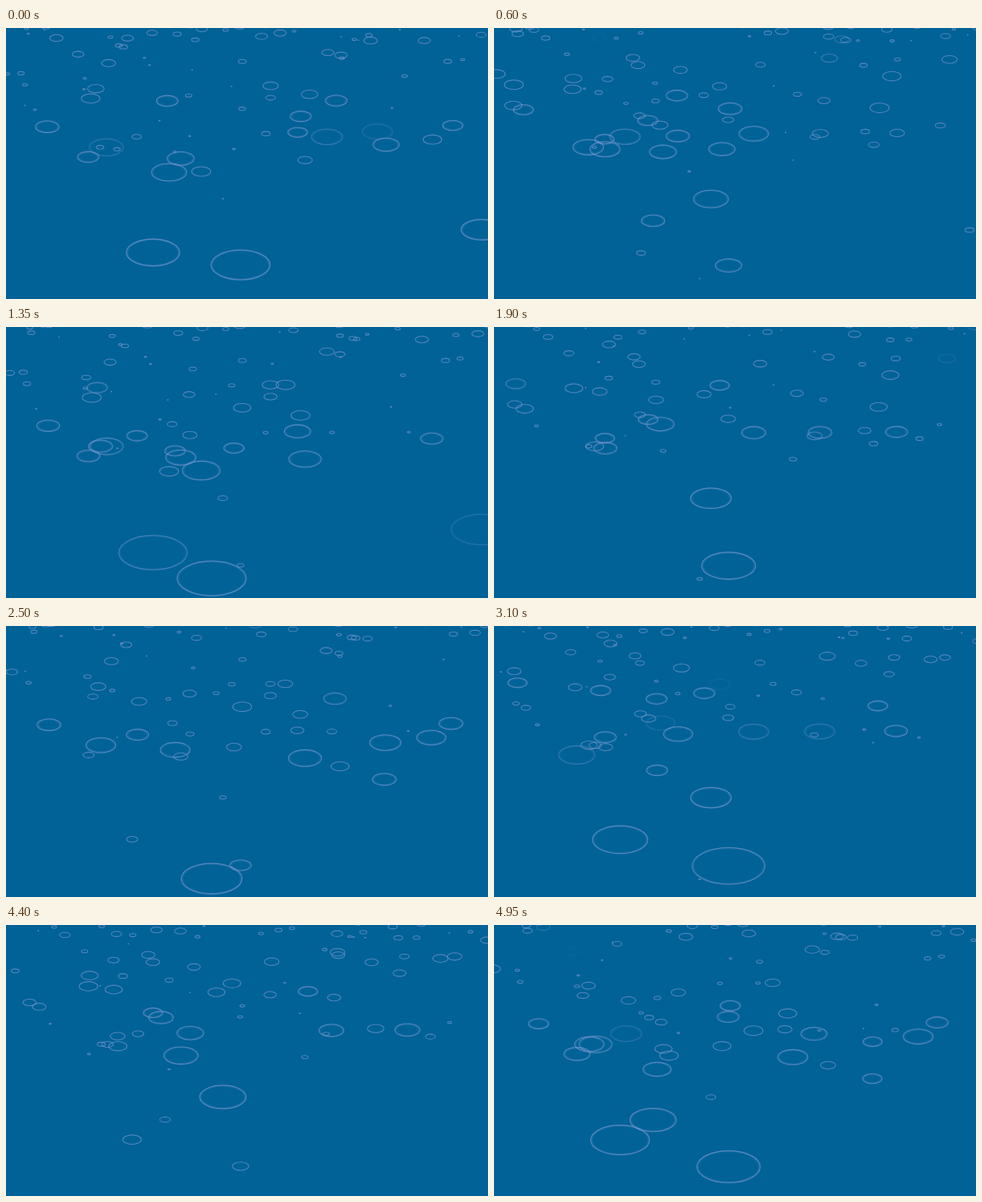
An HTML page with a canvas that plays this animation: 600x338 px, repeating every 5000 ms.

```html
<!DOCTYPE html>
<html lang="en">
<head>
<meta charset="utf-8">
<title>Rain on water</title>
<style>
  html, body { margin: 0; width: 100%; height: 100%; overflow: hidden; background: #006297; }
  canvas { display: block; width: 600px; height: 338px; }
</style>
</head>
<body>
<canvas id="water" width="600" height="338"></canvas>
<script>
const ctx = document.getElementById('water').getContext('2d');
const LOOP = 5, STEP = 0.05, LIFE = 0.9, FADE = 0.06;

let seed = 41;
function random() {
  seed = (seed * 16807) % 2147483647;
  return seed / 2147483647;
}

// A spot in the foreground where drops land at a steady beat
function steady(x, y, first, gap, count) {
  return { x, y, births: Array.from({ length: count }, (_, i) => first + i * gap) };
}

// A spot further out: denser towards the horizon, with random pauses
function scattered() {
  const y = -4 + 170 * random() ** 1.9;
  const spread = 630 - 2.5 * Math.max(0, y - 80);
  const x = 300 + (random() - 0.5) * spread;
  const births = [];
  for (let t = -1.5 * LIFE * random(); t < LOOP; t += LIFE * (1 + 0.7 * random())) births.push(t);
  return { x, y, births };
}

const spots = [
  steady(292, 295.5, -0.69, 0.98, 6),
  steady(183, 280, -0.67, 1.16, 2),
  steady(157, 263.8, 2.35, 1.8, 2),
  steady(256, 311.7, 0.6, 1.24, 3),
  steady(198, 240, 0.24, 4, 2),
  steady(592, 251.5, -0.59, 1.06, 2),
  steady(270, 213, -0.02, 1.2, 5),
  steady(203, 180, -0.75, 1.7, 4),
  steady(243, 179, -0.41, 0.95, 2),
  steady(471, 191, 2.02, 2.54, 2),
  steady(416, 175, 2.1, 1.26, 3),
  ...Array.from({ length: 115 }, scattered)
];

// Full ring radius at a given depth
function reach(y) {
  return 1.06 * (10.5 + 0.099 * (y - 46) + 0.00028 * (y - 46) * (y - 152));
}

function ring(x, y, r, alpha, width) {
  ctx.globalAlpha = alpha;
  ctx.lineWidth = width;
  ctx.beginPath();
  ctx.ellipse(x, y, r, r * 0.505, 0, 0, 2 * Math.PI);
  ctx.stroke();
}

function draw(t) {
  ctx.globalAlpha = 1;
  ctx.fillStyle = '#006297';
  ctx.fillRect(0, 0, 600, 338);
  ctx.strokeStyle = '#7d9bd2';
  for (const spot of spots) {
    // The camera tilts slowly: near water sinks, far water draws inwards
    const depth = spot.y - 180;
    const x = spot.x + (spot.x - 300) * Math.min(0, depth) * 0.00006 * t;
    const y = spot.y + Math.max(0, depth) * 0.0105 * t;
    const full = reach(spot.y);
    for (const birth of spot.births) {
      const p = (t - birth) / LIFE;
      if (p < 0 || p >= 1) continue;
      const r = Math.max(0.6, full * p);
      const fade = Math.min(1, (1 - p) / FADE);
      ring(x, y, r, 0.64 * fade, r > 25 ? 1.3 : 1.1);
      if (r > 12) ring(x, y, r - 1.5, 0.14 * fade, 2.2);
    }
  }
}

const start = performance.now();
function tick() {
  const t = ((performance.now() - start) / 1000) % LOOP;
  draw(Math.floor(t / STEP + 1e-6) * STEP);
  requestAnimationFrame(tick);
}
tick();
</script>
</body>
</html>
```
